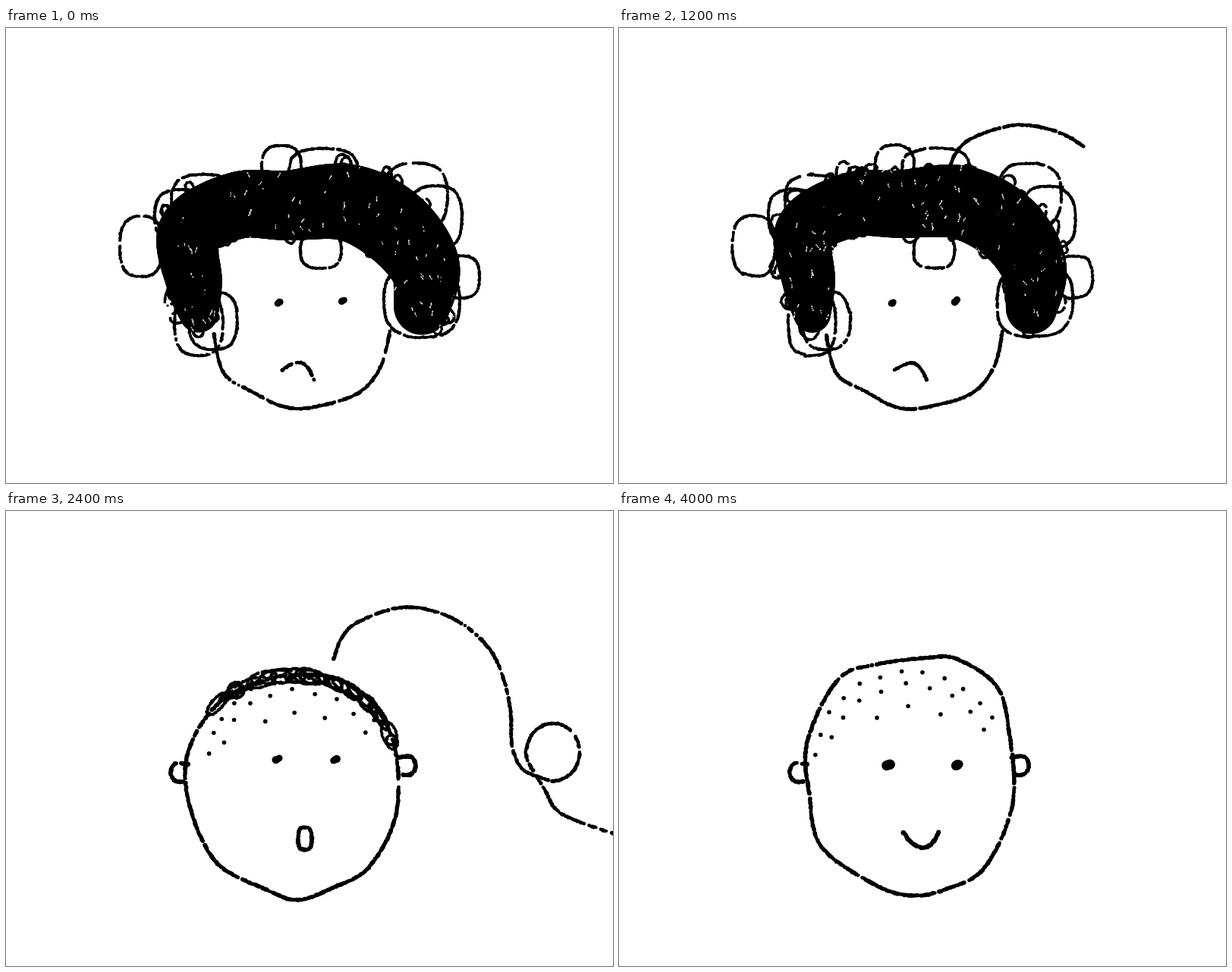
An HTML page with a canvas for the animation above (4.2 s loop, 800 px wide and 600 px high).

```html
<!DOCTYPE html>
<html lang="en">
<head>
<meta charset="utf-8">
<title>Haircut</title>
<style>
html, body { margin: 0; width: 100%; height: 100%; overflow: hidden; background: #fff; }
canvas { display: block; width: 100%; height: 100%; }
</style>
</head>
<body>
<canvas id="stage" width="800" height="600"></canvas>
<script>
const ctx = document.getElementById('stage').getContext('2d');
const STEP = 200, TAU = Math.PI * 2;
let seed = 1, wobble = 0;

function rand() {
  seed = (seed + 0x6D2B79F5) | 0;
  let t = Math.imul(seed ^ (seed >>> 15), 1 | seed);
  t = (t + Math.imul(t ^ (t >>> 7), 61 | t)) ^ t;
  return ((t ^ (t >>> 14)) >>> 0) / 4294967296;
}
const spread = a => (rand() * 2 - 1) * a;
const lerp = (a, b, k) => a + (b - a) * k;
const blend = (p, q, k) => p.map((v, i) => lerp(v, q[i], k));

// Catmull-Rom curve through points of any dimension, sampled about every 2px
function sample(points) {
  const out = [], at = i => points[Math.max(0, Math.min(points.length - 1, i))];
  for (let i = 0; i < points.length - 1; i++) {
    const [a, b, c, d] = [at(i - 1), at(i), at(i + 1), at(i + 2)];
    const k = Math.max(1, Math.round(Math.hypot(c[0] - b[0], c[1] - b[1]) / 2));
    for (let j = 0; j < k; j++) {
      const t = j / k;
      out.push(b.map((v, n) => v + t / 2 * (c[n] - a[n] +
        t * (2 * a[n] - 5 * v + 4 * c[n] - d[n] + t * (3 * (v - c[n]) + d[n] - a[n])))));
    }
  }
  return [...out, at(points.length - 1)];
}

function disc(x, y, r) {
  ctx.beginPath();
  ctx.arc(x, y, r, 0, TAU);
  ctx.fill();
}

// Rough marker made of round dabs with small gaps
function line(points, w = 5, from = 0, to = 1) {
  const s = sample(points.map(p => p.map(v => v + spread(wobble))));
  let skip = 0;
  for (const [x, y] of s.slice(s.length * from, Math.ceil(s.length * to))) {
    if (w < 6 && rand() < 0.03) skip = 2;
    if (skip-- > 0) continue;
    disc(x + spread(0.4), y + spread(0.4), w / 2 * (0.82 + rand() * 0.3));
  }
}

// Closed loop; square below 1 flattens its sides
function loop(x, y, rx, ry, w = 4, square = 1, tilt = 0) {
  const bend = v => Math.sign(v) * Math.abs(v) ** square, a0 = rand() * TAU, p = [];
  for (let i = 0; i <= 12; i++) {
    const a = a0 + i / 12 * TAU, u = bend(Math.cos(a)) * rx, v = bend(Math.sin(a)) * ry;
    p.push([x + u * Math.cos(tilt) - v * Math.sin(tilt), y + u * Math.sin(tilt) + v * Math.cos(tilt)]);
  }
  line(p, w);
}

// Hair styles: spine of [x, y, radius] and loose curls of [x, y, rx, ry]
const styles = [
  {
    spine: [[254, 376, 28], [248, 335, 40], [242, 268, 45], [305, 234, 48], [370, 234, 50],
      [450, 230, 55], [512, 262, 56], [552, 315, 50], [548, 368, 40]],
    curls: [[178, 288, 28, 40], [232, 248, 36, 35], [260, 226, 42, 33], [363, 184, 26, 29], [418, 186, 45, 27],
      [540, 222, 42, 44], [566, 250, 35, 42], [600, 328, 24, 28], [548, 360, 50, 48], [254, 390, 32, 42],
      [273, 386, 32, 38], [415, 293, 27, 24]],
    loops: 70, size: 11, flecks: 75
  },
  {
    spine: [[258, 386, 18], [262, 325, 26], [262, 265, 28], [310, 230, 38], [375, 222, 40],
      [445, 228, 40], [510, 262, 32], [518, 320, 28], [518, 382, 16]],
    curls: [[224, 246, 36, 34], [270, 205, 36, 38], [378, 178, 35, 30], [435, 185, 25, 25], [520, 195, 43, 43],
      [230, 362, 25, 42], [530, 360, 34, 38], [435, 280, 42, 25], [225, 290, 24, 38]],
    loops: 85, size: 25, flecks: 45
  },
  {
    spine: [[258, 390, 9], [260, 312, 19], [268, 265, 24], [320, 230, 30], [385, 220, 24],
      [445, 225, 30], [505, 252, 27], [515, 305, 20], [514, 382, 11]],
    curls: [[262, 240, 42, 44], [325, 200, 36, 20], [480, 205, 44, 34], [525, 265, 26, 60], [546, 345, 18, 12],
      [489, 377, 15, 11], [408, 262, 24, 24]],
    loops: 70, size: 18, flecks: 40
  }
];

// Level 0 is the full bush, 2 the thinnest scribble
function hair(level) {
  const a = styles[Math.floor(level)], b = styles[Math.ceil(level)], k = level % 1;
  const near = k < 0.5 ? a : b, size = lerp(a.size, b.size, k);
  const s = sample(a.spine.map((p, i) => blend(p, b.spine[i], k)));
  const pick = reach => {
    const [x, y, r] = s[Math.floor(rand() * s.length)], t = rand() * TAU;
    return [x + Math.cos(t) * r * reach, y + Math.sin(t) * r * reach];
  };
  s.forEach(([x, y, r]) => disc(x, y, r * 0.92));
  for (let i = 0; i < near.loops; i++) {
    const [x, y] = pick(0.85), far = Math.hypot(x - 390, y - 340), out = size * 0.3 / far;
    loop(x + (x - 390) * out, y + (y - 340) * out, size * (0.4 + rand() * 0.6), size * (0.5 + rand() * 0.7),
      4, 1, spread(0.4));
  }
  ctx.fillStyle = '#fff';
  for (let i = 0; i < near.flecks; i++) {
    const [x, y] = pick(Math.sqrt(rand())), d = 2 + rand() * 4;
    line([[x, y], [x + spread(3), y + d]], 1.8);
  }
  ctx.fillStyle = '#000';
  near.curls.forEach(([x, y, rx, ry]) => loop(x, y, rx, ry, 4.4, 0.75));
}

// Curls left on the scalp, lying along it
function stubble(n, size) {
  for (let i = 0; i < n; i++) {
    const a = lerp(-2.45, -0.22, (i + rand()) / n);
    loop(378 + Math.cos(a) * 134, 330 + Math.sin(a) * 113, size * (0.6 + rand() * 0.8),
      size * (0.3 + rand() * 0.4), 4.4, 1, a + Math.PI / 2);
  }
}

// Rows of [radius, first angle, last angle, count]
function dots(shrink = 1) {
  const rows = [[1, -3.05, -0.5, 12], [0.86, -2.85, -0.4, 9], [0.6, -2.2, -1, 3]];
  for (const [k, a, b, n] of rows) {
    for (let i = 0; i < n; i++) {
      const t = lerp(a, b, i / (n - 1)), r = k * shrink;
      disc(383 + Math.cos(t) * 124 * r + spread(1), 330 + Math.sin(t) * 117 * r + spread(3), 2.8);
    }
  }
}

const eyes = (lx, ly, rx, ry, w) =>
  [[lx, ly], [rx, ry]].forEach(([x, y]) => line([[x - 2, y + 1], [x + 2, y - 1]], w));
const frown = () => line([[364, 451], [375, 444], [387, 441], [398, 448], [406, 464]]);
const smile = () => line([[375, 424], [385, 437], [400, 444], [412, 439], [421, 424]], 6);
const jaw = () => line([[274, 404], [287, 455], [325, 480], [368, 500], [410, 499], [465, 481],
  [494, 446], [506, 400]]);

function ear(x, y, side) {
  line([[0, -11], [17, -12], [23, 0], [17, 11], [6, 12]].map(([u, v]) => [x + u * side, y + v]), 5.8);
}

const wide = [[400, 216], [350, 220], [284, 250], [242, 312], [240, 380], [276, 462], [345, 500], [385, 513],
  [430, 497], [478, 470], [514, 400], [512, 310], [480, 250], [440, 222], [400, 216]];
const tall = [[410, 193], [340, 202], [288, 223], [248, 305], [251, 375], [267, 443], [338, 493], [385, 507],
  [430, 499], [482, 470], [519, 385], [514, 290], [497, 230], [445, 195], [410, 193]];

function head(k) {
  line(wide.map((p, i) => blend(p, tall[i], k)), 5.4);
  ear(lerp(240, 248, k), 345, -1);
  ear(517, 336, 1);
}

function sad(level) {
  hair(level);
  jaw();
  eyes(360, 362, 444, 360, 9);
  frown();
}

function startled(level) {
  hair(level);
  jaw();
  eyes(356, 333, 439, 335, 11);
  loop(391, 435, lerp(5, 15, level - 1 > 0.5 ? 1 : 0.5), 10, 5.5);
}

function shorn(curls, size) {
  head(0);
  dots(0.93);
  stubble(curls, size);
  eyes(358, 327, 434, 328, 10);
  loop(394, 432, 9, 15, 5.5, 0.75);
}

function bald(k, happy = true) {
  head(k);
  dots();
  eyes(355, 335, 446, 335, 13);
  if (happy) smile();
  else loop(394, 434, 10, 13, 5.5);
}

// The strand that is pulled away: an arch, then a loose end or a coil with a tail
const arch = [[432, 195], [442, 168], [463, 147], [515, 128], [560, 131], [603, 150], [638, 183], [656, 222],
  [665, 265], [667, 310], [680, 340]];

function loose(to) {
  line([...arch, [696, 350], [722, 351], [746, 346]], 5, 0, to);
}

function coil(from, to, cx = 721, r = 35, end = 426) {
  const ring = [];
  for (let a = 2.1; a > -3.8; a -= 0.5) ring.push([cx + Math.cos(a) * r, 318 + Math.sin(a) * (r + 3)]);
  line([...arch, ...ring, [709, 366], [732, lerp(396, end, 0.1)], [802, end]], 5, from, to);
}

// [wobble, picture], one row per step
const steps = [
  [0, () => sad(0)],
  [1.5, () => sad(0)],
  [1.5, () => sad(0)],
  [1.5, () => sad(0)],
  [0.6, () => sad(0)],
  [1.5, () => sad(0)],
  [1, () => { sad(0.15); loose(0.44); }],
  [1, () => { startled(0.75); loose(0.8); }],
  [0, () => { startled(1); loose(1); }],
  [1, () => { startled(1.6); coil(0, 0.8); }],
  [0, () => { startled(2); coil(0, 0.96); }],
  [1, () => { shorn(75, 16); coil(0, 1); }],
  [0, () => { shorn(24, 15); coil(0, 1); }],
  [1, () => { shorn(10, 12); coil(0, 1); }],
  [1, () => { bald(0.7, false); coil(0, 1); }],
  [1, () => { bald(0.8); coil(0.4, 1); }],
  [0, () => { bald(0.8); coil(0.53, 1, 729, 29, 441); }],
  [1, () => { bald(0.85); coil(0.66, 1, 729, 29, 441); }],
  [1, () => { bald(1); coil(0.87, 1, 729, 29, 441); }],
  [1, () => bald(1)],
  [0, () => bald(1)]
];

let shown = -1;
function draw(i) {
  if (i === shown) return;
  shown = i;
  const [amount, picture] = steps[i];
  seed = 101 + i * 7919;
  wobble = amount;
  ctx.fillStyle = '#fff';
  ctx.fillRect(0, 0, 800, 600);
  ctx.fillStyle = '#000';
  picture();
}

const start = performance.now();
function tick() {
  draw(Math.floor((performance.now() - start) / STEP) % steps.length);
  requestAnimationFrame(tick);
}
tick();
</script>
</body>
</html>
```
